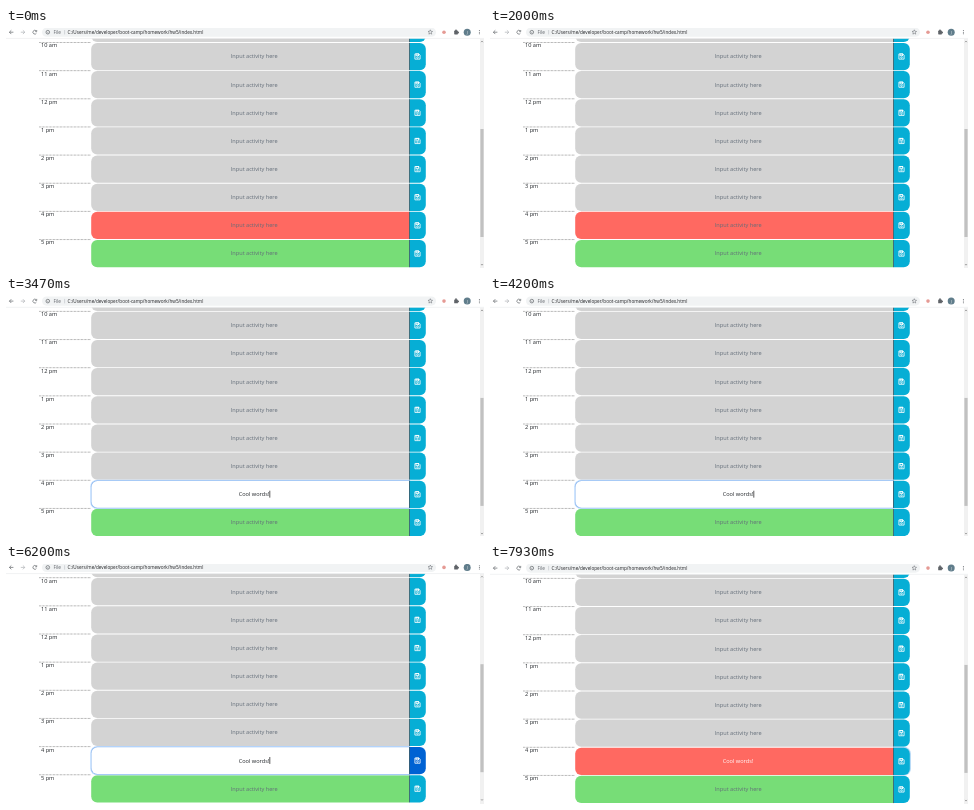
Recreate the animation shown at these times as an HTML page with a canvas. Size 478 px wide and 240 px high, loop 8000 ms.

```html
<!DOCTYPE html>
<html lang="en">
<head>
<meta charset="utf-8">
<title>Day planner</title>
<style>
html, body { margin: 0; width: 100%; height: 100%; overflow: hidden; background: #fff; }
canvas { display: block; width: 478px; height: 240px; }
</style>
</head>
<body>
<canvas id="stage"></canvas>
<script>
const W = 478, H = 240, LOOP = 8000, PITCH = 28.15;
const SANS = '"Open Sans", "Noto Sans", sans-serif';
const HOURS = ['9 am', '10 am', '11 am', '12 pm', '1 pm', '2 pm', '3 pm', '4 pm', '5 pm'];
const ACTIVE = 7;

// Each state holds until the next one starts; dy is the small page offset.
const STATES = [
  { at: 0, dy: 0, mode: 'empty' },
  { at: 2130, dy: 0.9, mode: 'edit' },
  { at: 4270, dy: -0.8, mode: 'edit', hover: true },
  { at: 6400, dy: -0.1, mode: 'saved' }
];

const canvas = document.getElementById('stage');
const ratio = window.devicePixelRatio || 1;
canvas.width = W * ratio;
canvas.height = H * ratio;
const c = canvas.getContext('2d');

function box(x, y, w, h, radii, fill) {
  c.beginPath();
  c.roundRect(x, y, w, h, radii);
  c.fillStyle = fill;
  c.fill();
}

function text(str, x, y, size, color, align = 'left') {
  c.font = `${size}px ${SANS}`;
  c.textAlign = align;
  c.textBaseline = 'alphabetic';
  c.fillStyle = color;
  c.fillText(str, x, y);
}

function line(points, color, width = 0.7) {
  c.beginPath();
  points.forEach(([x, y], i) => i ? c.lineTo(x, y) : c.moveTo(x, y));
  c.strokeStyle = color;
  c.lineWidth = width;
  c.stroke();
}

function dot(x, y, r, color) {
  c.beginPath();
  c.arc(x, y, r, 0, Math.PI * 2);
  c.fillStyle = color;
  c.fill();
}

function ring(x, y, r, color, from = 0, to = Math.PI * 2) {
  c.beginPath();
  c.arc(x, y, r, from, to);
  c.strokeStyle = color;
  c.lineWidth = 0.7;
  c.stroke();
}

function saveIcon(x, y) {
  c.strokeStyle = '#fff';
  c.lineWidth = 0.8;
  c.beginPath();
  c.moveTo(x - 2.6, y - 2.6);
  c.lineTo(x + 1.4, y - 2.6);
  c.lineTo(x + 2.6, y - 1.4);
  c.lineTo(x + 2.6, y + 2.6);
  c.lineTo(x - 2.6, y + 2.6);
  c.closePath();
  c.stroke();
  c.strokeRect(x - 1.5, y - 2.6, 2.6, 1.8);
  ring(x, y + 1, 0.8, '#fff');
}

function row(i, state) {
  const top = 14.9 + (i - 1) * PITCH + state.dy;
  const h = PITCH - 0.9, mid = top + h / 2;
  const active = i === ACTIVE;
  const editing = active && state.mode === 'edit';
  const saved = active && state.mode === 'saved';

  c.setLineDash([0.7, 0.7]);
  line([[33, top - 0.4], [85, top - 0.4]], '#555', 0.6);
  c.setLineDash([]);
  text(HOURS[i], 35, top + 4.5, 5.6, '#212529');

  const left = [6, 0, 0, 6], right = [0, 6, 6, 0];
  if (editing) {
    box(84.2, top - 1, 320, h + 2, [7, 0, 0, 7], '#bfdcff');
    box(85, top - 0.2, 318.5, h + 0.4, left, '#8fb9ee');
    box(85.5, top + 0.3, 317.5, h - 0.6, left, '#fff');
  } else {
    const fill = active ? '#ff6961' : i > ACTIVE ? '#77dd77' : '#d3d3d3';
    box(85.2, top, 318, h, left, fill);
  }

  if (saved) box(403, top - 0.9, 17.9, h + 1.8, [0, 7, 7, 0], '#b3d7f5');
  box(403.5, top, 16.3, h, right, editing && state.hover ? '#0062d3' : '#06aed5');
  line([[403.5, top], [403.5, top + h]], '#244650', 0.7);
  saveIcon(411.5, mid);

  const base = mid + 1.9;
  if (editing || saved) {
    text('Cool words!', 248, base, 5.6, saved ? '#fff' : '#212529', 'center');
    if (editing) line([[263.8, mid - 3.6], [263.8, mid + 3.3]], '#111', 0.7);
  } else {
    text('Input activity here', 248.2, base, 5.6, '#626c78', 'center');
  }
}

function toolbar(dy) {
  const gray = '#5f6368', y = 4.2 + dy;
  c.fillStyle = '#fff';
  c.fillRect(0, 0, W, 10.6 + dy);
  box(36, y - 4.6, 394, 9.2, 4.6, '#f1f3f4');
  line([[0, 10.4 + dy], [W, 10.4 + dy]], '#e3e4e6', 0.5);

  line([[7.4, y], [3.4, y]], gray);
  line([[5.3, y - 1.9], [3.4, y], [5.3, y + 1.9]], gray);
  line([[14.8, y], [18.8, y]], '#aeb1b5');
  line([[16.9, y - 1.9], [18.8, y], [16.9, y + 1.9]], '#aeb1b5');
  ring(28.8, y, 1.9, gray, 0.5, 5.6);
  line([[30.7, y - 2.2], [30.7, y - 0.6], [29.2, y - 0.6]], gray);

  ring(41.8, y, 1.8, gray);
  line([[41.8, y - 0.3], [41.8, y + 1]], gray, 0.5);
  text('File', 47.4, y + 1.7, 4.7, gray);
  line([[58.6, y - 2.2], [58.6, y + 2.2]], '#b5b8bc', 0.5);
  text('C:/Users/me/developer/boot-camp/homework/hw5/index.html', 61.5, y + 1.7, 4.65, '#202124');

  const star = [];
  for (let i = 0; i <= 10; i++) {
    const a = i * Math.PI / 5 - Math.PI / 2, r = i % 2 ? 1.1 : 2.4;
    star.push([424.3 + r * Math.cos(a), y + r * Math.sin(a)]);
  }
  line(star, gray, 0.5);
  dot(438, y, 1.8, '#e59a94');
  box(448.2, y - 1.6, 3.7, 3.8, 0.6, gray);
  dot(450, y - 1.9, 0.9, gray);
  dot(452.1, y + 0.3, 0.9, gray);
  dot(461.2, y, 3.5, '#607d8b');
  text('J', 461.2, y + 1.4, 3.8, '#fff', 'center');
  for (const d of [-1.6, 0, 1.6]) dot(473.4, y + d, 0.5, gray);
}

function scrollbar(dy) {
  c.fillStyle = '#f1f1f1';
  c.fillRect(474, 10.6 + dy, 4, H);
  c.fillStyle = '#c1c1c1';
  c.fillRect(474.4, 101 + dy, 3.2, 108);
  line([[475, 14.2 + dy], [476, 13 + dy], [477, 14.2 + dy]], '#777', 0.6);
  line([[475, 236 + dy], [476, 237.2 + dy], [477, 236 + dy]], '#777', 0.6);
}

function draw(t) {
  const state = STATES.filter(s => s.at <= t).pop();
  c.setTransform(ratio, 0, 0, ratio, 0, 0);
  c.fillStyle = '#fff';
  c.fillRect(0, 0, W, H);
  HOURS.forEach((_, i) => { if (i !== ACTIVE) row(i, state); });
  row(ACTIVE, state);
  scrollbar(state.dy);
  toolbar(state.dy);
}

const start = performance.now();
function tick() {
  draw((performance.now() - start) % LOOP);
  requestAnimationFrame(tick);
}
tick();
</script>
</body>
</html>
```
